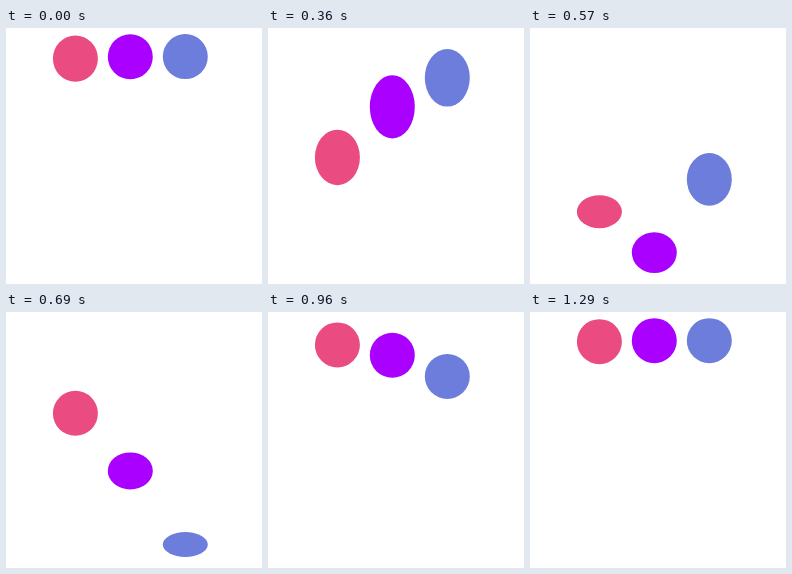
An HTML page for the animation above (1320 ms loop, 256 by 256 pixels).

```html
<!DOCTYPE html>
<html lang="en">
<head>
<meta charset="utf-8">
<title>Bouncing balls</title>
<style>
html, body { margin: 0; width: 100%; height: 100%; overflow: hidden; background: #fff; }
svg { display: block; width: 100%; height: 100%; }
</style>
</head>
<body>
<svg viewBox="0 0 256 256">
  <ellipse cx="69.4" rx="22.5" fill="#ea4b80"/>
  <ellipse cx="124.3" rx="22.5" fill="#aa00ff"/>
  <ellipse cx="179.3" rx="22.5" fill="#6c7ddc"/>
</svg>
<script>
const LOOP = 1320, HALF = LOOP / 2, STEP = 30, STAGGER = 90;
const CONTACT = 503, APEX = CONTACT - HALF;
const REST = 28.6, FLOOR = 245, SIZE = 45;
const balls = document.querySelectorAll('ellipse');

// Rises from 0 at a to 1 at b, back to 0 at c.
const tent = (t, a, b, c) => Math.max(0, Math.min((t - a) / (b - a), (c - t) / (c - b)));

// Stretch while falling, squash on the floor.
const height = t => SIZE + 18.5 * tent(t, -20, 275, 472) - 20 * tent(t, 472, 510, 660);

// Accelerating fall that slackens near the floor, then an eased rise.
function drop(t) {
  const r = 1 - Math.abs(t - CONTACT) / HALF;
  return t < CONTACT
    ? r ** 3 * (182 + 40 * Math.sin(5 * (r - 0.63)))
    : 222 * r ** 3.35;
}

function draw(now) {
  const t = Math.floor((now % LOOP) / STEP) * STEP;
  balls.forEach((ball, i) => {
    const local = (t - i * STAGGER - APEX + LOOP) % LOOP + APEX;
    const ry = height(local) / 2;
    ball.setAttribute('cy', Math.min(REST + drop(local), FLOOR - ry).toFixed(2));
    ball.setAttribute('ry', ry.toFixed(2));
  });
}

const origin = performance.now();
function tick() {
  draw(performance.now() - origin);
  requestAnimationFrame(tick);
}
tick();
</script>
</body>
</html>
```
